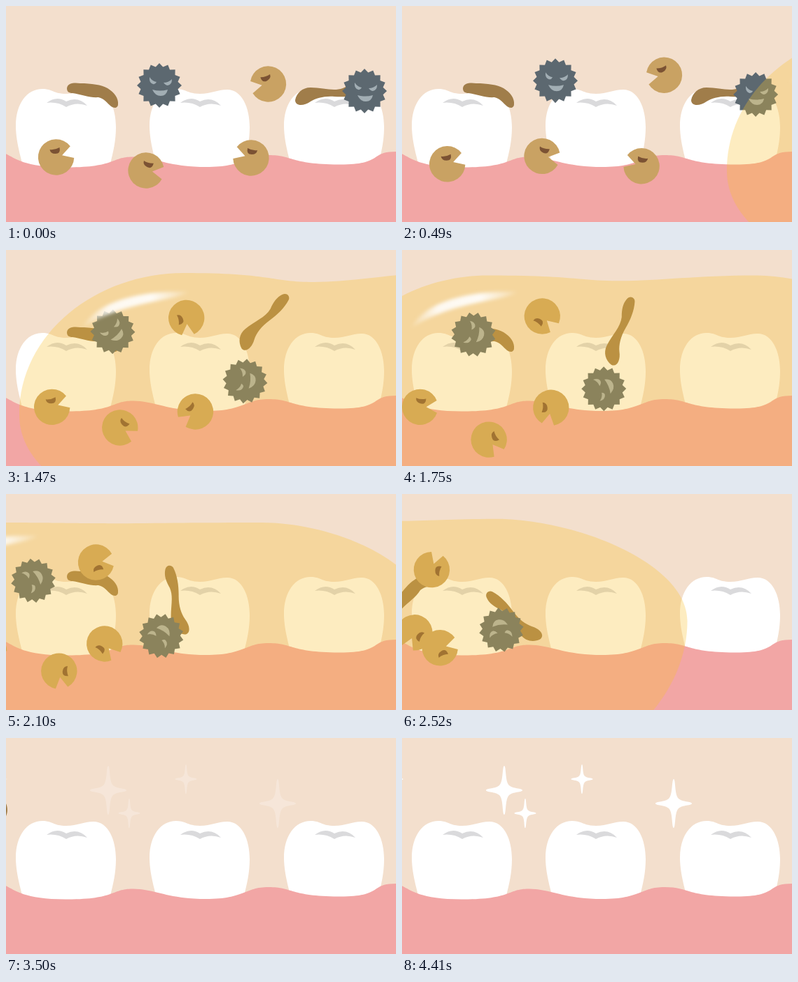
An HTML page that plays this animation: 557x310 px, repeating every 4.76 s.

```html
<!DOCTYPE html>
<html lang="en">
<head>
<meta charset="utf-8">
<title>Clean teeth</title>
<style>
  html, body { margin: 0; width: 100%; height: 100%; overflow: hidden; background: #f3dfcd; }
  svg { display: block; width: 100%; height: 100%; }
  .gum { fill: #f2a6a5; }
  .crease { fill: #dadadc; }
  .stain { fill: #a07d4a; }
  .germ { fill: #5c6870; }
  .face { fill: #a2aeb4; }
  .pac { fill: #c9a263; }
  .eye { fill: #7b5233; }
  .gel { fill: #f8c030; fill-opacity: .3; }
  .spark { fill: #fff; }
</style>
</head>
<body>
<svg viewBox="0 0 557 310">
  <defs>
    <linearGradient id="shine">
      <stop offset="0" stop-color="#fff" stop-opacity=".1"/>
      <stop offset=".25" stop-color="#fff" stop-opacity=".85"/>
      <stop offset=".65" stop-color="#fff" stop-opacity=".9"/>
      <stop offset="1" stop-color="#fff" stop-opacity=".1"/>
    </linearGradient>
    <filter id="soft" x="-20%" y="-40%" width="140%" height="180%">
      <feGaussianBlur stdDeviation="2.4"/>
    </filter>
    <g id="tooth">
      <path fill="#fff" d="M14 172C14 140 30 119 52 119C66 119 68 126 86 126C103 126 110 120 125 120C146 120 157 146 157 174C157 194 153 210 149 226L146 245H28C24 226 14 198 14 172Z"/>
      <path class="crease" d="M58 139Q72 128 86 137Q103 129 116 143Q100 137 86 145Q73 137 58 139Z"/>
    </g>
    <g id="germ">
      <path id="burr" class="germ"/>
      <path class="face" d="M-14-12Q-10-6-4-5Q-6-1-9-2Q-15-4-14-12ZM18-9Q13-4 6-4Q9 0 12 0Q18-1 18-9ZM-10 6Q1 9 12 6Q10 15 2 15Q-6 15-10 6Z"/>
    </g>
    <g id="pac">
      <path class="pac" transform="rotate(-18)" d="M24.2 8.8A25.7 25.7 0 1 1 24.2-8.8L9 0Z"/>
      <path class="eye" d="M-9-11Q-2-10 5-14Q7-5-1-5Q-8-5-9-11Z"/>
    </g>
    <path id="spark" class="spark" d="M0-35C3-35 1-12 7-7 12-2 26-3 26 0 26 3 12 2 7 7 1 12 3 35 0 35-3 35-1 12-7 7-12 2-26 3-26 0-26-3-12-2-7-7-1-12-3-35 0-35Z"/>
  </defs>
  <use href="#tooth"/>
  <use href="#tooth" x="191"/>
  <use href="#tooth" x="383"/>
  <path class="gum" d="M-10 209C10 212 12 231 85 231.5S150 216 182 216.5 230 231 286 231 340 214 375 214 405 227 475 227.5C540 228 518 209 557 209V310H-10Z"/>
  <path id="stainA" class="stain" d="M-37-10C-36-18-26-18-18-17C-2-17 12-15 21-10C31-4 37 5 36 13C36 19 30 19 26 16C20 11 17 5 8 3C-4 4-16-1-29-3C-34-3-37-5-37-10Z"/>
  <path id="stainB" class="stain" d="M-50 9C-48-1-40-9-28-9C-10-9 4-3 18-8C28-13 36-15 44-13C52-11 51-3 46-1C34 4 20 5 6 4C-8 3-20 6-28 11C-38 18-50 18-50 9Z"/>
  <use id="germA" href="#germ"/>
  <use id="germB" href="#germ"/>
  <use id="pacA" href="#pac"/>
  <use id="pacB" href="#pac"/>
  <use id="pacC" href="#pac"/>
  <use id="pacD" href="#pac"/>
  <path id="gel" class="gel"/>
  <path id="glint" fill="url(#shine)" filter="url(#soft)" d="M90 112C106 78 165 57 242 60C224 74 150 72 90 112Z"/>
  <g id="sparks"></g>
</svg>
<script>
const STEP = 70, LAST = 4410, LOOP = 4760, BOB = 900, TEETH = 16;
const el = id => document.getElementById(id);
const clamp = v => Math.max(0, Math.min(1, v));
const wave = (t, period) => Math.cos(2 * Math.PI * t / period);

// Each item bobs in place (bx, by) until the gel catches it,
// then drifts left on a wavy line while spinning; rates are per ms.
const items = [
  { id: 'stainA', x: 124, y: 128, caught: 2100, pull: .25, rise: 20, swing: 500, spin: -.13 },
  { id: 'stainB', x: 463, y: 126, caught: 1000, pull: .2, rise: -30, swing: 310, fall: .013, spin: -.085 },
  { id: 'germA', x: 219, y: 110.5, by: 3.5, caught: 1100, pull: .18, rise: 14, swing: 800, spin: -.12 },
  { id: 'germB', x: 508.5, y: 124.5, bx: 3.5, by: -2.5, caught: 600, pull: .19, rise: 78, swing: 936, spin: -.098 },
  { id: 'pacA', x: 68, y: 222, bx: 3.5, by: -5, caught: 1470, pull: .143, spin: .06 },
  { id: 'pacB', x: 200, y: 225.5, by: 10.5, caught: 1200, pull: .138, rise: 52, swing: 370, turn: 27, spin: .08 },
  { id: 'pacC', x: 346, y: 224, bx: 4, by: -6, caught: 1100, pull: .206, rise: 9, swing: 235, spin: -.15, flip: true },
  { id: 'pacD', x: 374.5, y: 105.5, by: 6.5, caught: 900, pull: .205, rise: -17, swing: 550, turn: -29, spin: -.148, flip: true }
];

function place({ id, x, y, bx = 0, by = 0, caught, pull, rise = 0, swing = 1, fall = 0, turn = 0, spin, flip }, t) {
  const bob = wave(Math.min(t, caught), BOB), d = Math.max(0, t - caught);
  const px = x + bx * bob - pull * d;
  const py = y + by * bob + rise * Math.sin(d / swing) + fall * d;
  el(id).setAttribute('transform',
    `translate(${px} ${py}) rotate(${turn + spin * d})` + (flip ? ' scale(-1 1)' : ''));
}

// [time, left edge of the gel]
const gelKeys = [[0, 669], [490, 464], [1120, 201], [1470, 19], [3360, -862], [3640, -1000]];

function gelLeft(t) {
  const i = gelKeys.findIndex(k => t < k[0]);
  if (i < 0) return gelKeys.at(-1)[1];
  const [t0, a] = gelKeys[i - 1], [t1, b] = gelKeys[i];
  return a + (b - a) * (t - t0) / (t1 - t0);
}

// Round head, wavy top and a tail that sags as it comes into view
function gelPath(t) {
  const sag = clamp(1 - Math.abs(t - 2100) / 630);
  const dip = 46 - 9 * clamp((t - 1470) / 1470);
  const crest = 33 + 8 * sag;
  return `M80 350C20 310 0 275 0 236C0 120 110 ${crest} 235 ${crest}S360 ${dip} 421 ${dip}`
    + `S530 ${crest} ${600 + 40 * sag} ${crest}`
    + `C${720 + 20 * sag} ${38 + 3 * sag} 878 ${105 - 9 * sag} 878 182C878 240 850 300 790 350Z`;
}

el('burr').setAttribute('d', 'M' + Array.from({ length: TEETH * 2 }, (_, i) => {
  const r = i % 2 ? 27 : 32, a = i * Math.PI / TEETH;
  return [r * Math.cos(a), r * Math.sin(a)];
}).join('L') + 'Z');

const stars = [[146, 75, 1], [176, 108, .6], [257, 59, .6], [388, 94, 1], [-14, 59, .6]];
for (const [x, y, size] of stars) {
  const use = document.createElementNS('http://www.w3.org/2000/svg', 'use');
  use.setAttribute('href', '#spark');
  use.setAttribute('transform', `translate(${x} ${y}) scale(${size})`);
  el('sparks').append(use);
}

function draw(t) {
  items.forEach(item => place(item, t));
  const left = gelLeft(t);
  el('gel').setAttribute('d', gelPath(t));
  el('gel').setAttribute('transform', `translate(${left})`);
  el('glint').setAttribute('transform', `translate(${left + .124 * Math.max(0, t - 1470)})`);
  el('sparks').setAttribute('opacity', clamp((t - 3360) / 420) * (.8 + .2 * wave(t - LAST, 700)));
}

const start = performance.now();
function tick() {
  const t = (performance.now() - start) % LOOP;
  draw(Math.min(LAST, Math.floor(t / STEP) * STEP));
  requestAnimationFrame(tick);
}
tick();
</script>
</body>
</html>
```
